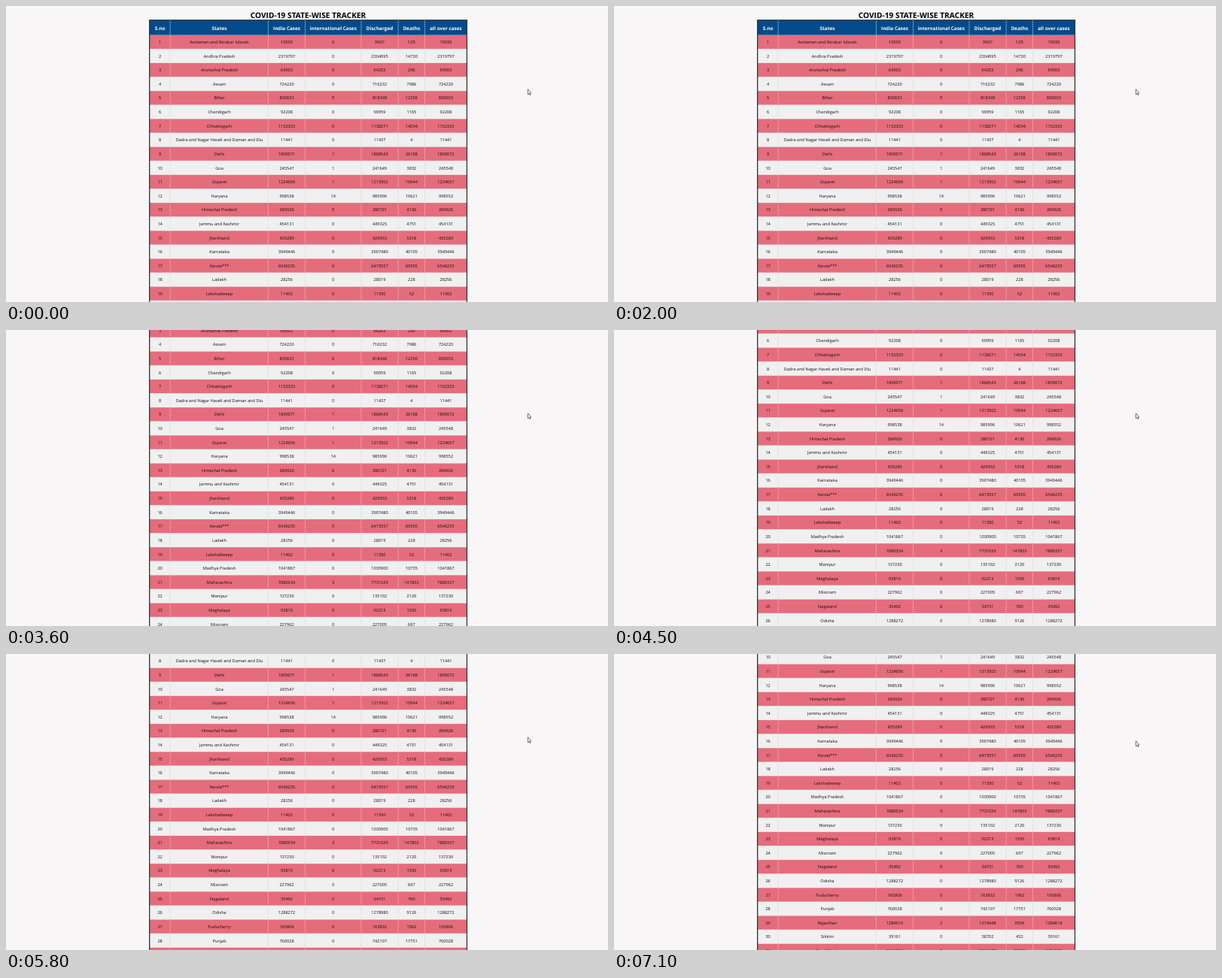
Recreate the animation shown at these times as an HTML page. Size 800x394 px, loop 8000 ms.

```html
<!DOCTYPE html>
<html lang="en">
<head>
<meta charset="utf-8">
<title>State-wise tracker</title>
<style>
  html, body { margin: 0; width: 100%; height: 100%; overflow: hidden; background: #f8f6f7; }
  svg { display: block; width: 800px; height: 394px; }
  text {
    font-family: "Open Sans", "Noto Sans", sans-serif;
    font-size: 5.6px;
    text-anchor: middle;
    text-rendering: geometricPrecision;
    fill: #111;
  }
  .title { font-size: 10.2px; font-weight: 700; fill: #000; }
  .head { font-size: 6.4px; font-weight: 700; fill: #fff; }
</style>
</head>
<body>
<svg id="stage" viewBox="0 0 800 394">
  <g id="page"></g>
  <path id="cursor" d="M693.6 110.8V117.6L695.1 116.3L696.1 118.6L697.2 118.1L696.2 115.9H698Z"
        fill="#fff" stroke="#333" stroke-width=".7" stroke-linejoin="round"/>
</svg>
<script>
const LOOP = 8000;
const LEFT = 190.7, RIGHT = 612.5, TOP = 18.8, BODY_TOP = 38.75, ROW = 18.61;
const WHEEL_STEP = 42.25;
const WHEEL_TIMES = [2600, 3500, 4400, 5500, 6400];
const DIVIDERS = [218.2, 348.5, 397.6, 472, 521.2, 556.6];
const CENTERS = [204.6, 283.5, 373, 434.8, 496.5, 538.9, 584.5];
const HEADINGS = ["S.no", "States", "India Cases", "international Cases",
  "Discharged", "Deaths", "all over cases"];

// state | India cases | discharged | deaths | international cases
const STATES = `Andaman and Nicobar Islands|10039|9907|129
Andhra Pradesh|2319797|2304995|14730
Arunachal Pradesh|64503|64203|296
Assam|724220|716232|7986
Bihar|830653|818348|12256
Chandigarh|92208|90959|1165
Chhattisgarh|1152333|1138271|14034
Dadra and Nagar Haveli and Daman and Diu|11441|11437|4
Delhi|1899071|1868543|26188|1
Goa|245547|241649|3832|1
Gujarat|1224656|1213502|10944|1
Haryana|998538|985996|10621|14
Himachal Pradesh|284926|280721|4136
Jammu and Kashmir|454131|449325|4751
Jharkhand|435289|429933|5318
Karnataka|3949446|3907480|40105
Kerala***|6546235|6473557|69355
Ladakh|28256|28019|228
Lakshadweep|11402|11350|52
Madhya Pradesh|1041867|1030900|10735
Maharashtra|7880334|7731029|147853|3
Manipur|137230|135102|2120
Meghalaya|93819|92213|1593
Mizoram|227962|227005|697
Nagaland|35492|34731|760
Odisha|1288272|1278980|9126
Puducherry|165806|163832|1962
Punjab|760028|742107|17751
Rajasthan|1284616|1274448|9554|2
Sikkim|39161|38702|452
Tamil Nadu|3454558|3416487|38026`.split("\n").map(line => line.split("|"));

const page = document.getElementById("page");
const cursor = document.getElementById("cursor");

function add(tag, attrs, content = "") {
  const node = document.createElementNS("http://www.w3.org/2000/svg", tag);
  for (const key in attrs) node.setAttribute(key, attrs[key]);
  node.textContent = content;
  page.append(node);
}

function band(y, height, fill) {
  add("rect", { x: LEFT, y, width: RIGHT - LEFT, height, fill });
}

function dividers(y, height, stroke) {
  for (const x of DIVIDERS) {
    add("path", { d: `M${x} ${y}v${height}`, stroke, "stroke-width": .7, "stroke-dasharray": "1.7 .8" });
  }
}

function cells(values, baseline, cls = "") {
  values.forEach((value, i) => add("text", { x: CENTERS[i], y: baseline, class: cls }, value));
}

function buildPage() {
  add("text", { x: 401.5, y: 15.7, class: "title" }, "COVID-19 STATE-WISE TRACKER");
  band(TOP, BODY_TOP - TOP, "#034b8b");
  dividers(TOP, BODY_TOP - TOP, "#dfe6ee");
  cells(HEADINGS, 31.8, "head");

  STATES.forEach(([name, india, discharged, deaths, abroad = 0], i) => {
    const y = BODY_TOP + i * ROW;
    const pink = i % 2 === 0;
    band(y, ROW, pink ? "#e56c7c" : "#f0f0f0");
    band(y + ROW - .45, .45, "#ddd");
    dividers(y, ROW, pink ? "#f0cdd2" : "#d6d6d6");
    cells([i + 1, name, india, abroad, discharged, deaths, +india + +abroad], y + ROW / 2 + 2);
  });

  add("rect", {
    x: LEFT, y: TOP, width: RIGHT - LEFT, height: BODY_TOP - TOP + STATES.length * ROW,
    fill: "none", stroke: "#333", "stroke-width": 1.3
  });
}

function render(t) {
  const ticks = WHEEL_TIMES.filter(time => t >= time).length;
  const nudge = t >= 6400 ? 5 : t >= 6000 ? 3 : 0;
  page.setAttribute("transform", `translate(0 ${-ticks * WHEEL_STEP})`);
  cursor.setAttribute("transform", `translate(0 ${nudge})`);
}

function frame() {
  render(performance.now() % LOOP);
  requestAnimationFrame(frame);
}

buildPage();
frame();
</script>
</body>
</html>
```
